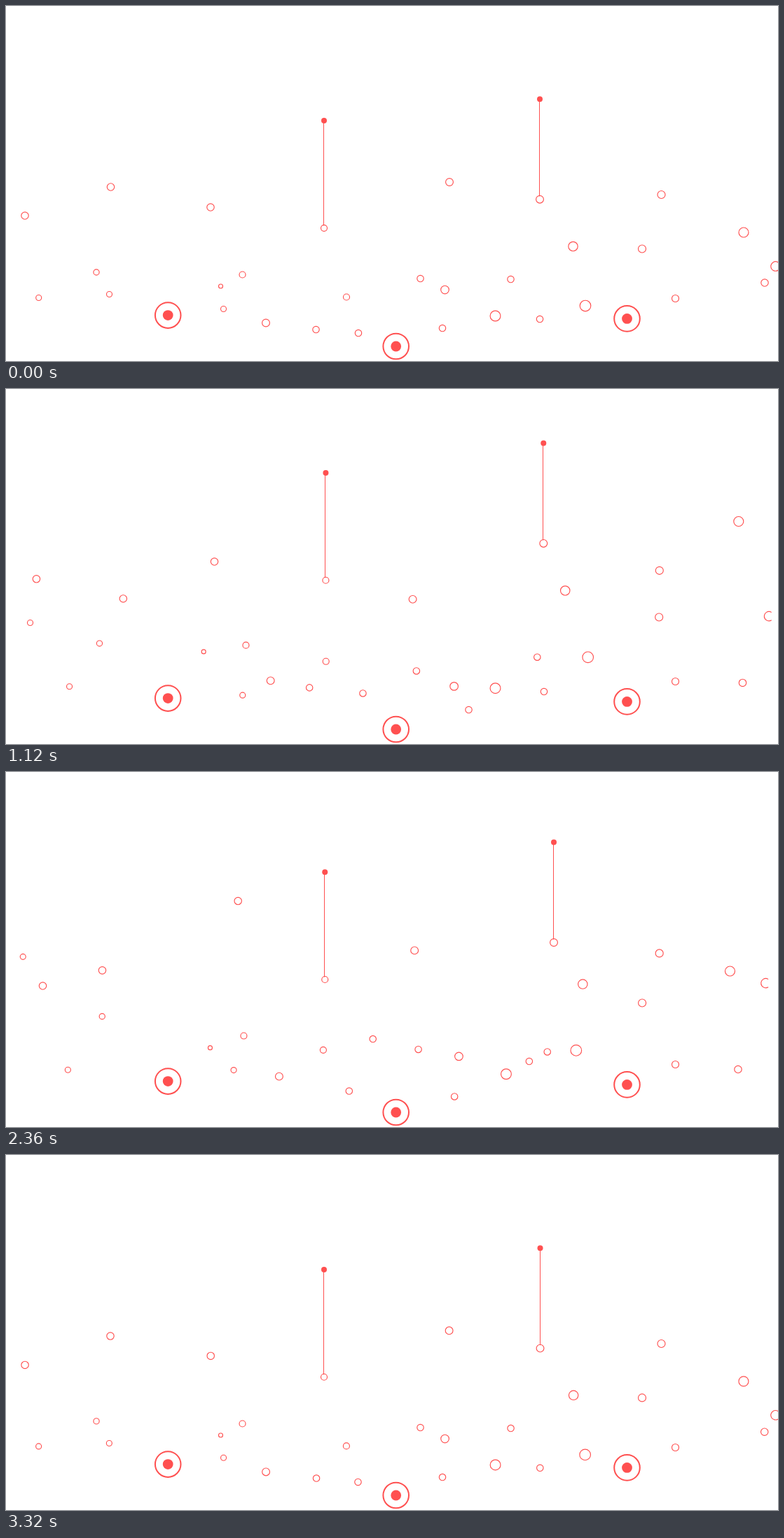
These frames come from a looping animation (1102 px wide and 508 px high, 3.36 s). An HTML page with a canvas:

```html
<!DOCTYPE html>
<html lang="en">
<head>
<meta charset="utf-8">
<title>Drifting dots</title>
<style>
html, body { margin: 0; width: 100%; height: 100%; overflow: hidden; background: #fff; }
canvas { display: block; width: 1102px; height: 508px; }
</style>
</head>
<body>
<canvas id="stage" width="1102" height="508"></canvas>
<script>
const ctx = document.getElementById('stage').getContext('2d');
const RED = '#ff5050';
const STEP = 40, STEPS = 84;
const dots = [];

// Periodic curve through a few keys: eases to rest where it turns, never overshoots.
function curve(ts, vs) {
  const n = ts.length;
  const gap = ts.map((t, i) => (i + 1 < n ? ts[i + 1] : STEPS) - t);
  const slope = vs.map((v, i) => (vs[(i + 1) % n] - v) / gap[i]);
  const tan = slope.map((b, i) => {
    const p = (i + n - 1) % n, a = slope[p];
    if (a * b <= 0) return 0;
    const wa = 2 * gap[i] + gap[p], wb = gap[i] + 2 * gap[p];
    return (wa + wb) / (wa / a + wb / b);
  });
  return t => {
    let i = n - 1;
    while (ts[i] > t) i--;
    const j = (i + 1) % n, h = gap[i], s = (t - ts[i]) / h, q = 1 - s;
    return vs[i] * q * q * (1 + 2 * s) + vs[j] * s * s * (3 - 2 * s)
      + h * s * q * (tan[i] * q - tan[j] * s);
  };
}

// Radius, home position, then the turning points as [x, y, step].
function dot(r, x, y, ...turns) {
  const keys = [[x, y, 0], ...turns];
  const [xs, ys, ts] = [0, 1, 2].map(k => keys.map(key => key[k]));
  const item = { r, x: curve(ts, xs), y: curve(ts, ys) };
  dots.push(item);
  return item;
}

// Poles
dot(4.5, 454, 317.8, [456.5, 272, 20], [456, 283.5, 45]).pole = 153.7;
dot(5.4, 762, 276.7, [754.5, 229.3, 20], [797, 213.5, 42], [782, 244, 59]).pole = 143.4;

// Upper band
dot(5.2, 149.5, 259, [167.5, 300, 27], [136, 292, 50]);
dot(5.2, 27, 300, [30, 259, 20], [78, 308.5, 44], [52.5, 306, 59]);
dot(5.2, 292, 288, [294.5, 252.5, 18], [297.5, 247, 28], [331.5, 184, 61]);
dot(5.4, 633, 252, [579, 302, 31], [578.5, 288.5, 45], [589, 244.5, 67]);
dot(5.5, 935.5, 270, [931.5, 255, 45]);
dot(5.5, 908, 347.5, [934.5, 328, 20], [920, 325, 45], [908, 331, 60]);
dot(7, 1053, 324, [1049, 187, 24], [1023.5, 231.5, 45], [1033.5, 285, 59]);
dot(6.7, 1098.5, 372.5, [1082, 290, 51]).cut = 3.7;
dot(6.7, 809.5, 344, [796.5, 288, 22], [823.5, 305, 61]);

// Lower left
dot(4.1, 129, 381, [137.7, 348, 55]);
dot(4, 147.5, 412.5, [63.7, 432, 45]);
dot(4, 46.7, 417.5, [23, 256, 55]);
dot(3, 306.5, 401, [282, 374, 22], [284, 388.5, 45]);
dot(4.5, 337.5, 384.5, [342.5, 366.5, 25]);
dot(4, 310.5, 433.5, [338.5, 440, 21], [329, 426, 52]);
dot(5.4, 371, 453.5, [375.5, 416.5, 22], [390, 435, 58]);

// Lower middle
dot(4.7, 442.5, 463, [441, 458, 18], [433, 425, 29], [524, 382, 60]);
dot(4.5, 486, 416.5, [463, 389.7, 22], [442, 391, 47]);
dot(4.7, 503, 468, [516, 433, 20], [487, 448, 46]);
dot(4.7, 591.5, 390, [585.5, 404.3, 33]);
dot(5.8, 626.5, 406, [639, 425.5, 27], [653, 408, 47]);
dot(4.7, 623, 461, [661, 459, 30], [652.5, 465.5, 45]);

// Lower right
dot(4.7, 720.5, 391, [769, 434, 20], [761.5, 427, 45]);
dot(7.4, 698.5, 443.5, [698.5, 427.8, 31], [714, 432.5, 60]);
dot(4.7, 762, 448, [758, 383.5, 25], [773, 403, 62]);
dot(7.8, 827, 429, [832.5, 383.3, 22], [813, 394, 54]);
dot(5.2, 1083, 396, [1045, 425.5, 38], [1045, 425.5, 64]);
dot(5, 955.5, 418.5);

const targets = [[231.2, 442.6], [556.7, 487], [886.5, 447.4]];

function circle(x, y, r, width, open = 0) {
  ctx.beginPath();
  ctx.arc(x, y, r, open, 2 * Math.PI - open);
  if (width) {
    ctx.lineWidth = width;
    ctx.stroke();
  } else {
    ctx.fill();
  }
}

function draw(t) {
  ctx.clearRect(0, 0, 1102, 508);
  ctx.strokeStyle = ctx.fillStyle = RED;
  for (const d of dots) {
    const x = d.x(t), y = d.y(t);
    circle(x, y, d.r, 1.15, d.cut ? Math.acos(d.cut / d.r) : 0);
    if (d.pole) {
      const top = y - d.pole;
      ctx.fillRect(Math.round(x) - 1, top, 1, d.pole - d.r + 1);
      circle(x, top, 4);
    }
  }
  for (const [x, y] of targets) {
    circle(x, y, 18.3, 2);
    circle(x, y, 7.4);
  }
}

function tick(now) {
  draw(Math.floor(now / STEP) % STEPS);
  requestAnimationFrame(tick);
}
draw(0);
requestAnimationFrame(tick);
</script>
</body>
</html>
```
